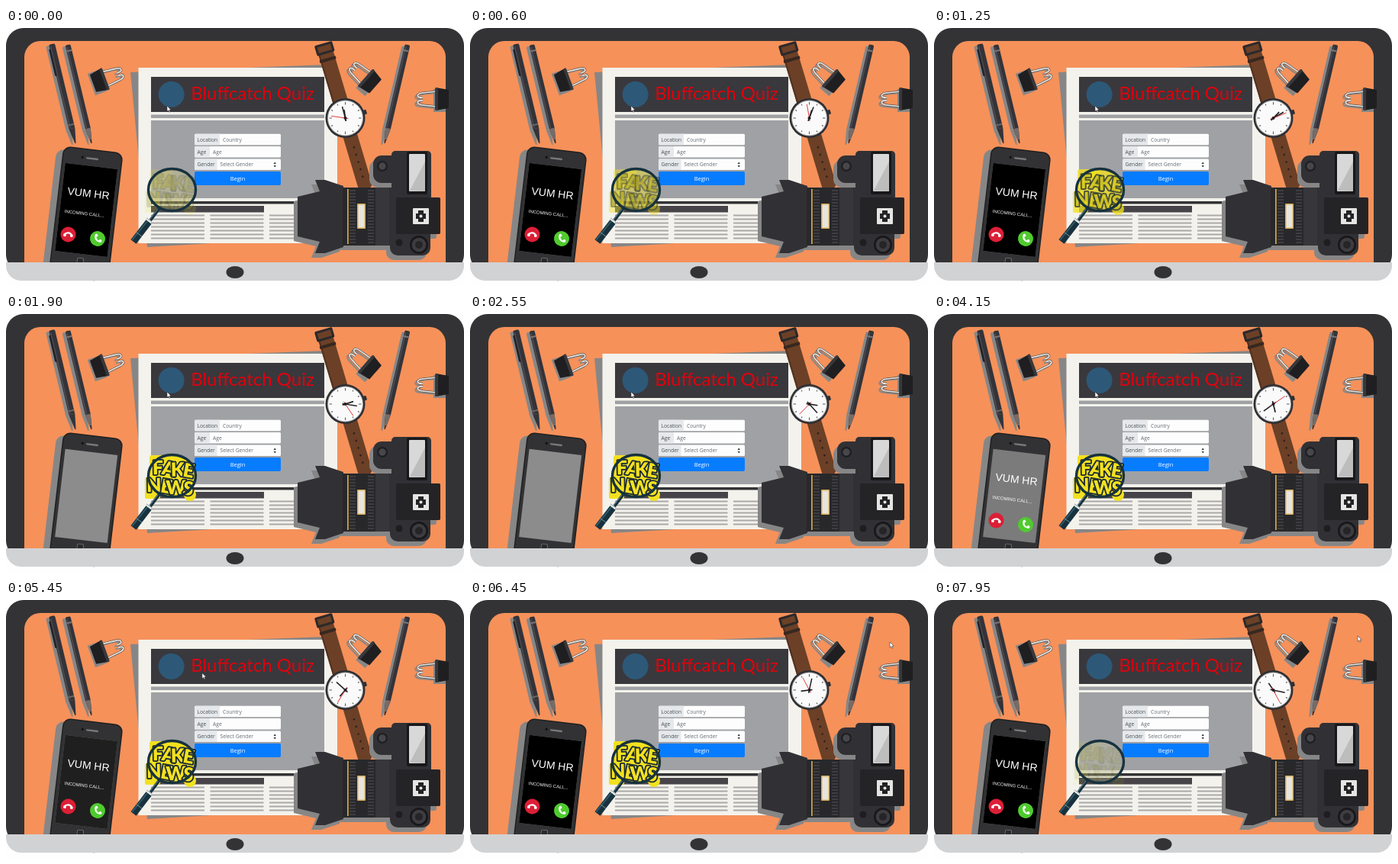
Recreate the animation shown at these times as an HTML page with a canvas. Size 600 by 338 pixels, loop 8 s.

```html
<!DOCTYPE html>
<html lang="en">
<head>
<meta charset="utf-8">
<style>
html, body { margin: 0; width: 100%; height: 100%; overflow: hidden; background: #fefefe; }
canvas { display: block; width: 600px; height: 338px; }
</style>
</head>
<body>
<canvas id="stage"></canvas>
<script>
const LOOP = 8000;
const canvas = document.getElementById('stage');
const ratio = window.devicePixelRatio || 1;
canvas.width = 600 * ratio;
canvas.height = 338 * ratio;
const c = canvas.getContext('2d');
const DARK = '#333335', BODY = '#313135', SHADE = '#878686', YELLOW = '#f3e11f', INK = '#17323f';

const ramp = (t, a, b) => Math.max(0, Math.min(1, (t - a) / (b - a)));
const ease = x => x * x * (3 - 2 * x);

function rect(x, y, w, h, fill, r = 0) {
  c.fillStyle = fill;
  c.beginPath();
  c.roundRect(x, y, w, h, r);
  c.fill();
}
function poly(points, fill) {
  c.fillStyle = fill;
  c.beginPath();
  points.forEach(p => c.lineTo(...p));
  c.closePath();
  c.fill();
}
function oval(x, y, rx, ry, fill) {
  c.fillStyle = fill;
  c.beginPath();
  c.ellipse(x, y, rx, ry, 0, 0, 7);
  c.fill();
}
const disc = (x, y, r, fill) => oval(x, y, r, r, fill);
function line(x1, y1, x2, y2, color, w, cap = 'butt') {
  c.strokeStyle = color;
  c.lineWidth = w;
  c.lineCap = cap;
  c.beginPath();
  c.moveTo(x1, y1);
  c.lineTo(x2, y2);
  c.stroke();
}
function text(s, x, y, font, fill, align = 'left') {
  c.font = font;
  c.fillStyle = fill;
  c.textAlign = align;
  c.fillText(s, x, y);
}
function at(x, y, angle, draw) {
  c.save();
  c.translate(x, y);
  c.rotate(angle);
  draw();
  c.restore();
}

function monitor() {
  rect(0, 0, 600, 338, '#fefefe');
  rect(0, 0, 600, 320, DARK, 23);
  rect(24, 17, 552, 300, '#f6915a', [21, 21, 0, 0]);
}
function base() {
  rect(0, 307, 600, 24, '#d1d2d4', [0, 0, 20, 20]);
  oval(300, 320, 11.5, 8, DARK);
}

function pen(x1, y1, x2, y2, w, clipped) {
  const len = Math.hypot(x2 - x1, y2 - y1), neck = len - 20;
  const outline = fill => {
    rect(-w / 2, 0, w, neck, fill, [2, 2, 0, 0]);
    poly([[-w / 2, neck], [w / 2, neck], [0.6, len], [-0.6, len]], fill);
  };
  const angle = Math.atan2(y2 - y1, x2 - x1) - Math.PI / 2;
  at(x1 - 4, y1 + 2, angle, () => outline(SHADE));
  at(x1, y1, angle, () => {
    outline('#333339');
    rect(-w / 2 + 1, 3, 1.5, neck - 4, '#4d4d53');
    if (clipped) {
      rect(-w / 2 - 1.5, 6, 2.5, 36, '#232327', 1);
      rect(-w / 2, neck - 6, w, 2, '#68686b');
    } else {
      poly([[-w / 2, neck], [w / 2, neck], [1.2, len - 5], [-1.2, len - 5]], '#766b66');
      rect(-w / 2, 7, w, 2, '#77757a');
    }
  });
}

// A binder clip whose wire handle points towards -x.
function binder(x, y, angle) {
  const wire = (color, w) => {
    c.strokeStyle = color;
    c.lineWidth = w;
    c.beginPath();
    c.moveTo(1, -10);
    c.lineTo(-18, -8);
    c.bezierCurveTo(-27, -7, -27, -1, -18, -2);
    c.moveTo(-18, 2);
    c.bezierCurveTo(-27, 1, -27, 7, -18, 8);
    c.lineTo(1, 10);
    c.stroke();
  };
  at(x - 3, y + 2, angle, () => {
    wire(SHADE, 2);
    rect(-1, -15, 16, 30, SHADE);
  });
  at(x, y, angle, () => {
    wire('#55504e', 3);
    wire('#e9e7e3', 1.7);
    poly([[-1, -15], [16, -12], [16, 12], [-1, 15]], '#1f1f21');
    rect(-2, -15, 4, 30, '#38383b', 1.5);
  });
}

function field(y, label, split, value) {
  const font = '6.7px "Open Sans", sans-serif';
  rect(247, y, 113, 14.5, '#fdfdfd', 1.5);
  rect(247, y, split - 247, 14.5, '#e6e9ec', [1.5, 0, 0, 1.5]);
  text(label, 250.5, y + 9.8, font, '#495057');
  text(value, split + 4, y + 9.8, font, '#656c73');
}

function paper() {
  poly([[163, 58], [420, 48], [438, 272], [185, 287]], SHADE);
  rect(173.5, 52, 260.5, 230, '#f3f2ec');
  rect(190, 64, 227, 46, '#39383d');
  rect(190, 113.5, 227, 4.5, '#a0a1a5');
  rect(190, 121, 227, 102, '#a0a1a5');
  rect(190, 227, 227, 3.5, DARK);
  rect(190, 233, 148, 8.5, '#464449');
  for (let x = 190; x < 400; x += 77.5)
    for (let y = 244.5; y < 276; y += 5) rect(x, y, 70, 2, '#aaa9a9');
  disc(216.6, 87, 17, '#2d5878');
  text('Bluffcatch Quiz', 323, 94, '24px Lato, sans-serif', '#e3000b', 'center');
  field(138.7, 'Location', 280, 'Country');
  field(155, 'Age', 267, 'Age');
  field(171.5, 'Gender', 276.5, 'Select Gender');
  [-1, 1].forEach(s =>
    poly([[350.5, 179 + s], [353.9, 179 + s], [352.2, 179 + s * 3.4]], '#343a40'));
  rect(247, 188, 113, 18, '#087cff', 2);
  text('Begin', 303.5, 199.8, '7.5px "Open Sans", sans-serif', '#fff', 'center');
}

function word(s, x, y, step) {
  c.font = '900 25px Lato, sans-serif';
  c.textAlign = 'center';
  c.lineJoin = 'round';
  at(x, y, 0.1, () => [...s].forEach((ch, i) =>
    at(i * step, 0, i % 2 ? 0.08 : -0.12, () => {
      c.strokeStyle = '#1c2b36';
      c.lineWidth = 3.6;
      c.strokeText(ch, 0, 0);
      c.fillStyle = YELLOW;
      c.fillText(ch, 0, 0);
    })));
}

function headline(alpha) {
  c.save();
  c.globalAlpha = alpha;
  oval(217, 212, 31, 27, YELLOW);
  rect(188, 185, 30, 25, YELLOW, 3);
  rect(182, 214, 20, 28, YELLOW, 2);
  disc(241, 237, 8, YELLOW);
  word('FAKE', 199, 210, 13);
  word('NEWS', 194, 233, 14.5);
  c.restore();
}

function magnifier(alpha) {
  oval(217.5, 212, 31, 28, 'rgba(178,183,184,.28)');
  headline(alpha);
  c.strokeStyle = INK;
  c.lineWidth = 3.4;
  c.beginPath();
  c.ellipse(217.5, 212, 31, 27.5, 0, 0, 7);
  c.stroke();
  line(201, 236, 189, 252, INK, 4);
  line(199, 237, 188, 251, '#78939a', 1);
  line(187, 254, 167, 280, INK, 9);
  line(185, 253, 165, 278, '#315866', 2);
  line(191, 254, 184, 249, '#a8b8ba', 1.5);
  line(178, 273, 171, 268, '#78939a', 1);
}

function callButton(x, y, fill, turn) {
  at(x, y, turn, () => {
    disc(0, 0, 10, fill);
    c.strokeStyle = '#fff';
    c.lineWidth = 2.2;
    c.lineCap = 'butt';
    c.beginPath();
    c.arc(0, 4, 6, -2.6, -0.54);
    c.stroke();
    [-6.2, 2.7].forEach(dx => rect(dx, -0.3, 3.5, 3.2, '#fff', 1));
  });
}

function phone(t) {
  const tilt = 0.117, font = '"Liberation Sans", Arial, sans-serif';
  const ringing = t < 1900 || t >= 3900;
  const black = t < 1900 ? 1 : ramp(t, 3900, 5900);
  at(105, 163, tilt, () => rect(-39, 0, 78, 166, SHADE, 10));
  at(114.5, 159, tilt, () => {
    rect(-39.5, 0, 79, 166, '#202022', 10);
    rect(-38, 1.5, 76, 163, '#323234', 9);
    rect(-8, 11, 16, 2.5, '#78787b', 1.2);
    disc(-13, 12, 1.6, '#111');
    rect(-34.5, 22, 69, 116, '#8c8c8d');
    rect(-34.5, 22, 69, 116, `rgba(0,0,0,${black})`);
    rect(-4.5, 143, 9, 9, '#77777a', 2);
    rect(-3.7, 143.8, 7.4, 7.4, '#29292b', 1.5);
  });
  if (!ringing) return;
  at(107.5, 221.5, tilt, () => text('VUM HR', 0, 0, '14px ' + font, '#fff', 'center'));
  at(102.5, 245, tilt, () => text('INCOMING CALL...', 0, 0, '6px ' + font, '#fff', 'center'));
  callButton(81.5, 270.5, '#dc1f36', tilt);
  callButton(120, 276, '#4fcb2e', tilt - 2.3);
}

function hand(degrees, length, color, w) {
  at(0, 0, degrees * Math.PI / 180, () => line(0, 4, 0, -length, color, w));
}

function watch(t) {
  at(444.5, 118, -0.29, () => {
    rect(-10, -100, 20, 92, '#6b4027');
    rect(-10, 10, 19, 87, '#6b4027', [0, 0, 6, 6]);
    rect(-10, -100, 2, 80, '#543120');
    rect(-12, -102, 24, 14, '#2a292b', 2);
    rect(-9, -99, 18, 8, '#6b4027');
    rect(-11, -82, 22, 4, '#38271f', 1);
    for (let y = 40; y < 90; y += 10) disc(0, y, 1.3, '#2f2019');
    rect(24, -3, 5, 6, '#303034', 1);
  });
  at(444.5, 118, 0, () => {
    disc(0, 0, 26, '#2e2e32');
    disc(0, 0, 23.5, '#a9a9aa');
    disc(0, 0, 22.5, '#fafafa');
    for (let i = 0; i < 12; i++)
      at(0, 0, i * Math.PI / 6, () => line(0, -21, 0, i % 3 ? -19 : -17.5, '#444', 0.9));
    hand(t * 0.042 - 8, 11, '#202024', 1.7);
    hand(t * 0.06 - 15, 15.5, '#202024', 1.5);
    hand(t * 0.12 + 278, 18.5, '#e13432', 0.9);
    disc(0, 0, 2, '#202024');
  });
}

function cameraOutline(fill) {
  const half = [[442, 40], [418, 48], [405, 48], [411, 33], [382, 26]];
  const mirrored = half.map(([x, d]) => [x, 247 + d]).reverse();
  poly([...half.map(([x, d]) => [x, 247 - d]), ...mirrored], fill);
  rect(438, 209, 72, 76, fill, 3);
  rect(481, 167, 76, 36, fill, 11);
  rect(505, 161, 52, 70, fill, 5);
  rect(500, 222, 69, 48, fill, 3);
  rect(503, 255, 53, 43, fill, 10);
}

function camera() {
  at(-5, 6, 0, () => cameraOutline(SHADE));
  cameraOutline(BODY);
  rect(441, 209, 43, 76, '#28282b');
  for (let y = 212; y < 282; y += 4) [450, 474].forEach(x => rect(x, y, 8, 2, '#3d3d41'));
  rect(447, 211, 1.8, 72, '#c9a451');
  rect(460, 230, 11, 33, '#d5ad55', 1);
  rect(461.5, 231.5, 8, 30, '#e6e5e1');
  rect(484, 209, 18, 76, '#37373b');
  rect(511, 222, 58, 48, '#242427', 2);
  rect(525, 162, 27, 56, '#18181b', 2);
  rect(528, 165, 21, 49, '#d8d8d8', 1);
  poly([[529, 213], [549, 175], [549, 214]], '#bdbdbe');
  rect(533, 236, 21, 21, '#e5e5e3', 1);
  rect(537, 243, 13, 7, '#232326');
  rect(540, 239, 7, 15, '#232326');
  disc(543.5, 246.5, 2, '#e5e5e3');
  disc(493, 181, 7, '#1f1f22');
  disc(493, 181, 4.7, '#47474b');
  disc(541, 284, 12, '#18181b');
  disc(541, 284, 9.3, '#3d3d41');
  disc(541, 284, 5, '#252528');
  disc(515, 281, 4.5, '#1e1e21');
}

function cursor(t) {
  const sweep = ease(ramp(t, 5250, 6120)), drift = ease(ramp(t, 6500, 7900));
  at(211 + 339 * sweep + 5 * drift, 102 - 47 * sweep - 8 * drift, 0, () => {
    poly([[0, 0], [0, 7.3], [1.7, 5.8], [2.9, 8.3], [4, 7.8], [2.9, 5.3], [5.2, 5.2]], '#fff');
    c.strokeStyle = '#222';
    c.lineWidth = 0.5;
    c.stroke();
  });
}

function draw(now) {
  const t = now % LOOP;
  c.setTransform(ratio, 0, 0, ratio, 0, 0);
  monitor();
  pen(60, 21, 91, 151, 8, true);
  pen(81, 22, 112, 151, 7, false);
  pen(526, 22, 496, 151, 7, false);
  binder(129, 67, Math.PI - 0.35);
  binder(472, 66, 0.72);
  binder(564, 93, 0);
  paper();
  watch(t);
  camera();
  phone(t);
  // The headline vanishes at once, then fades in again.
  magnifier(ramp((t + 300) % 8100, 0, 2000));
  base();
  cursor(t);
  requestAnimationFrame(draw);
}
requestAnimationFrame(draw);
</script>
</body>
</html>
```
